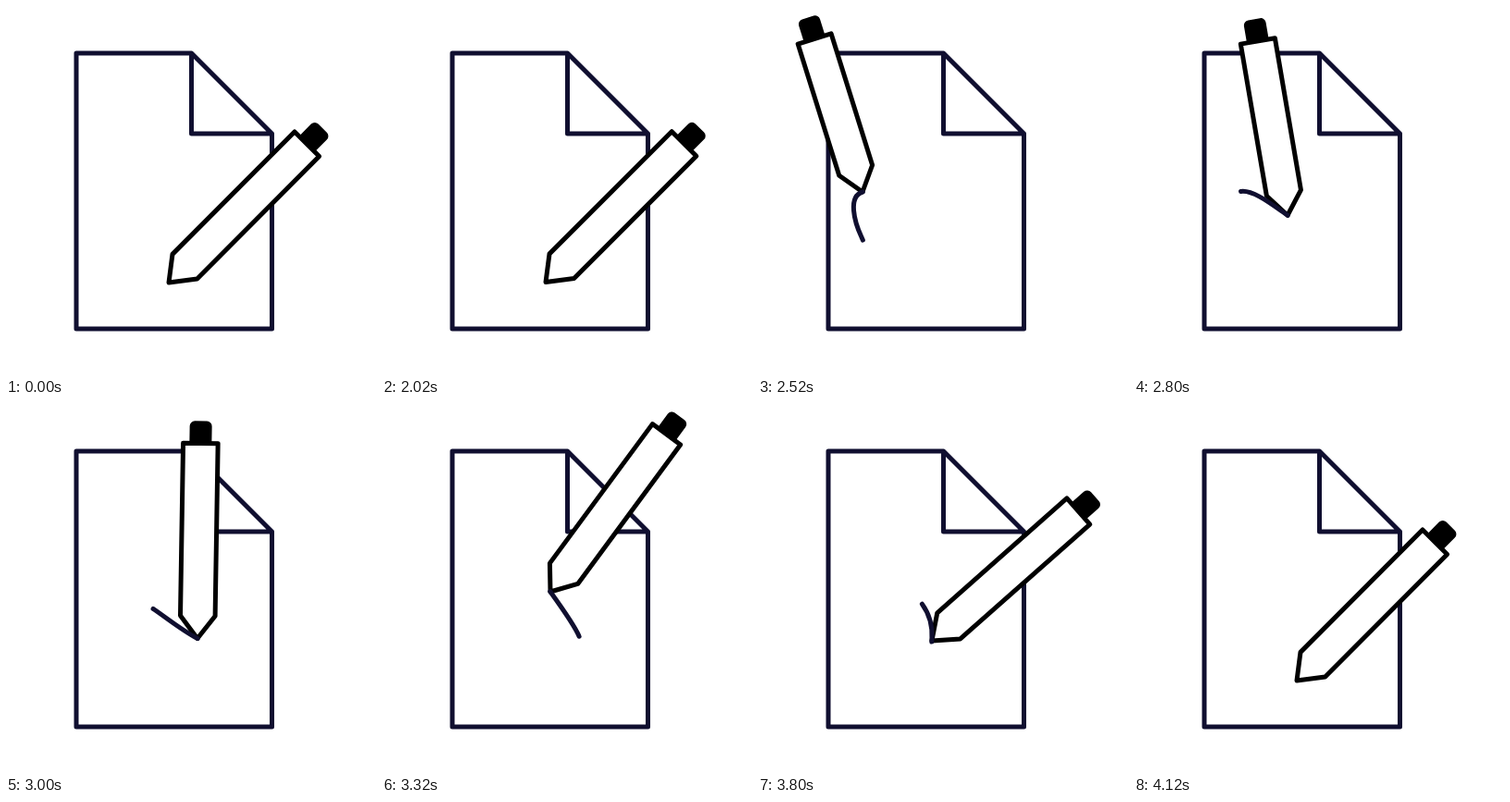
An HTML page that plays this animation: 400 by 400 pixels, repeating every 4.15 s.

```html
<!DOCTYPE html>
<html lang="en">
<head>
<meta charset="utf-8">
<title>Pen writing on a page</title>
<style>
  html, body { margin: 0; width: 100%; height: 100%; overflow: hidden; background: #fff; }
  svg { display: block; width: 100%; height: 100%; }
  path { fill: none; stroke-linecap: round; stroke-linejoin: round; }
  .ink { stroke: #100f30; stroke-width: 5; }
  #body { fill: #fff; stroke: #000; stroke-width: 5; }
</style>
</head>
<body>
<svg viewBox="0 0 400 400">
  <path class="ink" d="M76 51H200.5L287.5 138V349H76ZM200.5 51V138H287.5"/>
  <g id="pen">
    <rect id="cap" x="-12" width="24" height="28" rx="5.5"/>
    <path id="body"/>
  </g>
  <path id="trail" class="ink"/>
</svg>
<script>
const LOOP = 4150, START = 2020, STEP = 25, TRAIL = 58;
const $ = id => document.getElementById(id);
const pen = $('pen'), cap = $('cap'), body = $('body'), trail = $('trail');

// Route of the pen tip: the time at which each curve ends
const route = [
  [2300, 'C166 309 126 284 112 250'],
  [2520, 'C104 233 97 206 113 201'],
  [2765, 'C125 197 143 210 160 222'],
  [3000, 'C176 233 192 246 208 254'],
  [3055, 'C213 257 217 258 213 251'],
  [3320, 'C208 239 195 221 182 203'],
  [3430, 'C177 197 171 187 167.5 190'],
  [3570, 'C164 193 167 205 173 211'],
  [3780, 'C182 220 189 236 188 254'],
  [4120, 'C187 274 184 291 176 299']
];

const travel = [[START, 0]];
let d = 'M177 298.5';
for (const [time, curve] of route) {
  d += curve;
  trail.setAttribute('d', d);
  travel.push([time, trail.getTotalLength()]);
}
const total = trail.getTotalLength();

const tilt = [
  [2020, 45], [2520, -17.4], [2570, -19.5], [2780, -10.5], [3000, 1.2],
  [3070, 11.5], [3180, 23.5], [3320, 36.4], [3430, 42], [3570, 46.7],
  [3680, 49], [3800, 48.5], [4120, 44.9]
];
const barrel = [[2020, 187], [2520, 149], [2760, 163], [3000, 187]];
const tailLength = [[3680, TRAIL], [4120, 0]];

function at(keys, t) {
  if (t <= keys[0][0]) return keys[0][1];
  for (let i = 1; i < keys.length; i++) {
    const [t0, a] = keys[i - 1], [t1, b] = keys[i];
    if (t < t1) return a + (b - a) * (t - t0) / (t1 - t0);
  }
  return keys[keys.length - 1][1];
}

function draw(now) {
  let t = now % LOOP;
  t = t < START ? LOOP : START + Math.floor((t - START + 5) / STEP) * STEP;

  const s = at(travel, t);
  const tip = trail.getPointAtLength(s);
  const top = -24.5 - at(barrel, t);
  pen.setAttribute('transform', `translate(${tip.x} ${tip.y}) rotate(${at(tilt, t)})`);
  body.setAttribute('d', `M0 0L-18.8 -24.5V${top}H18.8V-24.5Z`);
  cap.setAttribute('y', top - 24);

  const len = Math.min(s, at(tailLength, t));
  trail.style.visibility = len < 1 ? 'hidden' : 'visible';
  trail.style.strokeDasharray = `${len} ${2 * total}`;
  trail.style.strokeDashoffset = len - s;
}

const origin = performance.now();
function tick() {
  draw(performance.now() - origin);
  requestAnimationFrame(tick);
}
tick();
</script>
</body>
</html>
```
